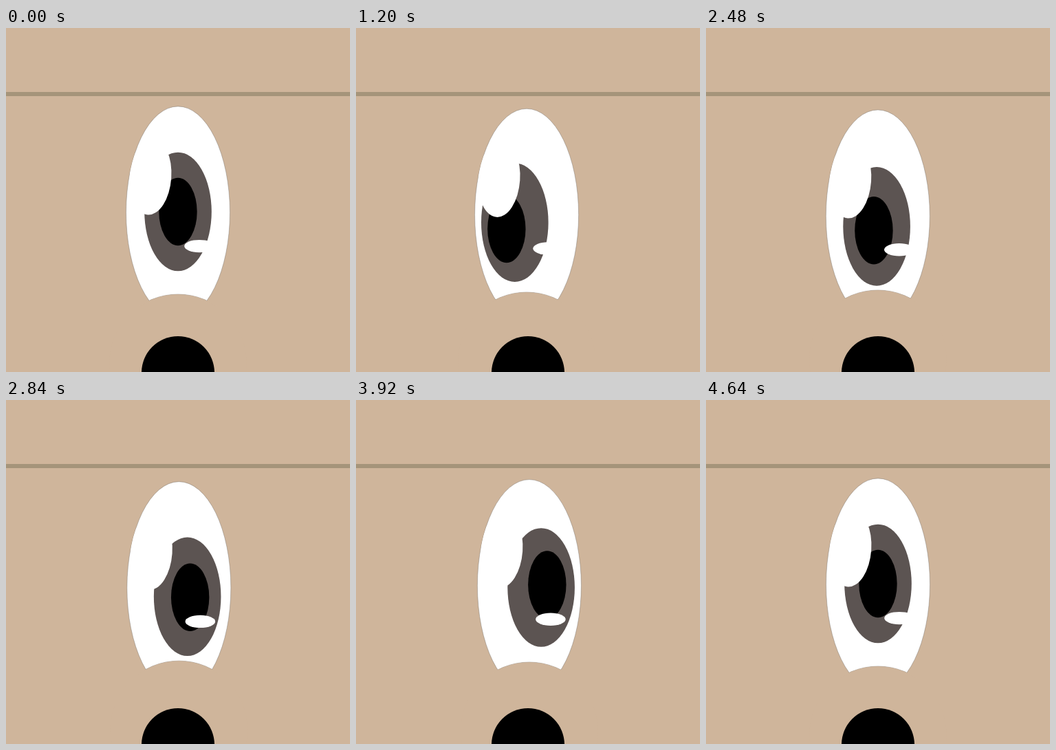
An HTML page with a canvas for the animation above (5 s loop, 500x500 px).

```html
<!DOCTYPE html>
<html lang="en">
<head>
<meta charset="utf-8">
<title>Looking around</title>
<style>
html, body { margin: 0; width: 100%; height: 100%; overflow: hidden; background: #cfb59b; }
canvas { display: block; width: 100vw; height: 100vh; }
</style>
</head>
<body>
<canvas width="500" height="500"></canvas>
<script>
const ctx = document.querySelector('canvas').getContext('2d');
const SKIN = '#cfb59b';
const LOOP = 5000, STEP = 40;

// Key points of the gaze: time, shift right, shift down, lid lift
const keys = [
  [0, 0, 0, 0],
  [1200, -19.2, 15.7, 3],
  [1800, -21.6, 23, 4],
  [2480, -1.9, 21.4, 6],
  [3280, 26.5, 14, 9.5],
  [3920, 19.1, 5.5, 6],
  [4640, 0, 0, 0]
];

// Monotone cubic: speed is zero at turning points and at both ends.
function valueAt(col, t) {
  const rate = i => (keys[i + 1][col] - keys[i][col]) / (keys[i + 1][0] - keys[i][0]);
  const slope = i => {
    if (i === 0 || i === keys.length - 1) return 0;
    const a = rate(i - 1), b = rate(i);
    return a * b > 0 ? 2 * a * b / (a + b) : 0;
  };
  let i = 0;
  while (i < keys.length - 2 && t > keys[i + 1][0]) i++;
  const from = keys[i], to = keys[i + 1], span = to[0] - from[0];
  const u = Math.min(1, (t - from[0]) / span), v = 1 - u;
  return from[col] * v * v * (1 + 2 * u) + to[col] * u * u * (3 - 2 * u)
    + span * u * v * (slope(i) * v - slope(i + 1) * u);
}

function ellipse(x, y, rx, ry, fill, tilt = 0) {
  ctx.beginPath();
  ctx.ellipse(x, y, rx, ry, tilt, 0, Math.PI * 2);
  ctx.fillStyle = fill;
  ctx.fill();
}

function outline() {
  ctx.strokeStyle = '#6b6660';
  ctx.lineWidth = 0.4;
  ctx.stroke();
}

function draw(t) {
  const [dx, dy, lift] = [1, 2, 3].map(col => valueAt(col, t));
  // The eyeball follows the gaze a little, the pupil leads it.
  const eyeX = 250 + 0.1 * dx, eyeY = 268.1 + 0.24 * dy + 0.02 * dx;
  const pupilX = 250 + 1.5 * dx - 0.15 * dy, pupilY = 267 + 1.25 * dy - 0.28 * dx;
  const lidY = 487 - lift;

  ctx.fillStyle = SKIN;
  ctx.fillRect(0, 0, 500, 500);
  ctx.fillStyle = '#a5947a';
  ctx.fillRect(0, 93, 500, 6);

  ellipse(eyeX, eyeY, 75.5, 154.2, '#fff');
  outline();
  ctx.save();
  ctx.clip();
  ellipse(250 + dx, 267 + dy, 48.8, 86.3, '#5c5452');
  ellipse(pupilX, pupilY, 27.7, 49.2, '#000');
  ellipse(eyeX - 40, eyeY - 52, 30.3, 55.5, '#fff', 0.07);
  ellipse(eyeX + 31, eyeY + 49, 21.8, 9.2, '#fff');
  ellipse(eyeX, lidY, 100, 100, SKIN);
  outline();
  ctx.restore();

  // Cover the rim of the eye below the lid, then add the nose.
  ellipse(eyeX, lidY, 99.8, 99.8, SKIN);
  ellipse(250, 501, 53, 53, '#000');
}

const start = performance.now();
function tick() {
  const t = (performance.now() - start) % LOOP;
  draw(Math.floor(t / STEP) * STEP);
  requestAnimationFrame(tick);
}
tick();
</script>
</body>
</html>
```
